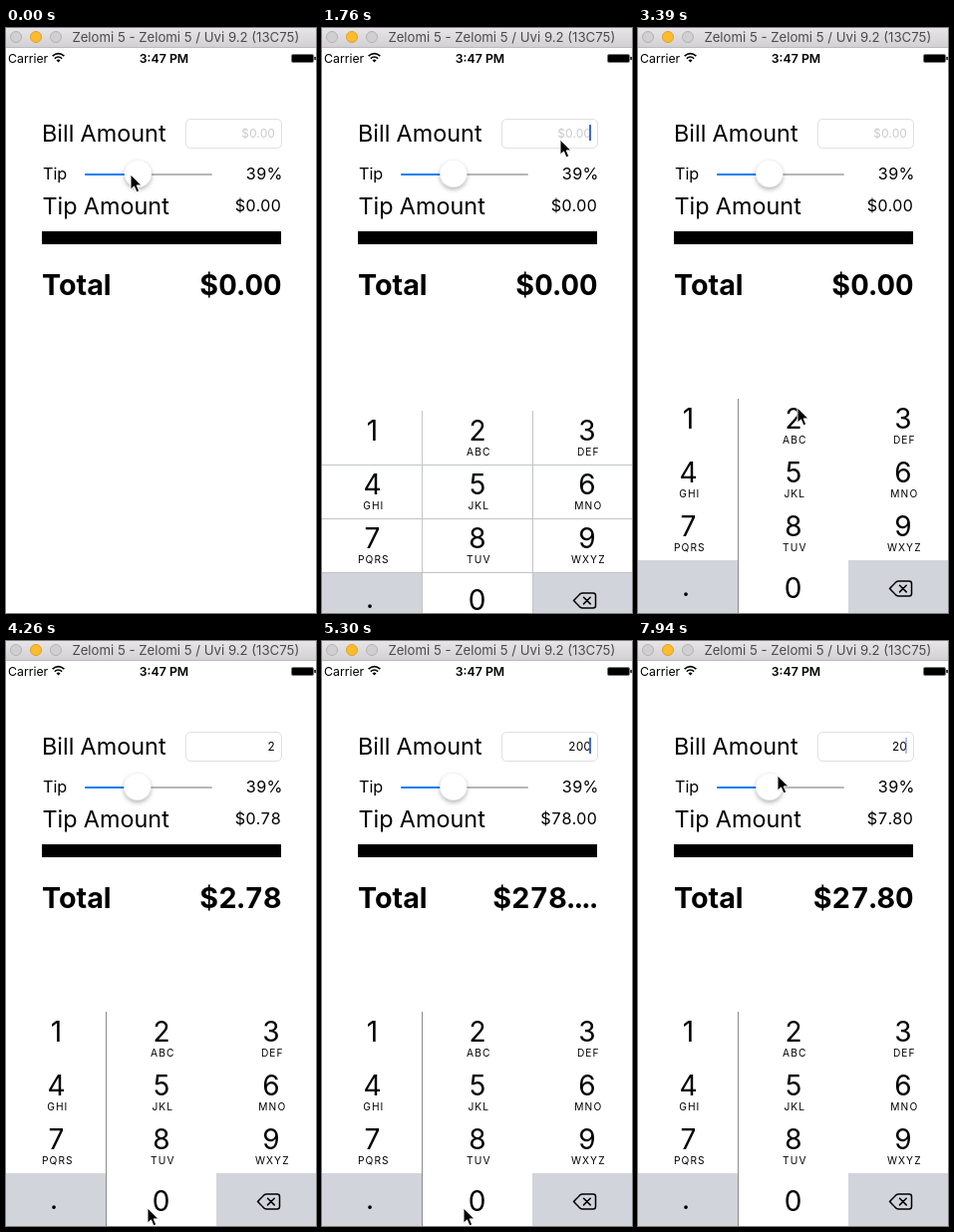
An HTML page that plays this animation: 311 by 587 pixels, repeating every 8000 ms.

```html
<!DOCTYPE html>
<html lang="en">
<head>
<meta charset="utf-8">
<title>Tip calculator</title>
<style>
html, body { margin: 0; width: 100%; height: 100%; overflow: hidden; background: #fff; }
svg { display: block; width: 311px; height: 587px; font-family: Inter, Roboto, sans-serif; font-variant-numeric: tabular-nums; }
.end { text-anchor: end; }
.mid { text-anchor: middle; }
.big { font-size: 23.4px; }
.body { font-size: 16.2px; }
.total { font-size: 28.7px; font-weight: 700; }
.small { font-size: 11.8px; }
.status { font-size: 12.3px; font-variant-numeric: normal; }
.digit { font-size: 28px; font-variant-numeric: normal; }
.letters { font-size: 10.2px; letter-spacing: 1.1px; }
</style>
</head>
<body>
<svg viewBox="0 0 311 587">
  <defs>
    <linearGradient id="chrome" x2="0" y2="1">
      <stop stop-color="#e7e5e8"/><stop offset="1" stop-color="#d1cfd2"/>
    </linearGradient>
    <filter id="shadow" x="-50%" y="-50%" width="200%" height="200%">
      <feDropShadow dx="0" dy="2.5" stdDeviation="2" flood-opacity=".28"/>
    </filter>
  </defs>

  <rect width="311" height="20" fill="url(#chrome)"/>
  <path d="M0 19.5H311" stroke="#bcbabd"/>
  <g fill="#d0d0d0" stroke="#b2b2b2">
    <circle cx="10" cy="9" r="5.5"/>
    <circle cx="30" cy="9" r="5.5" fill="#fdbc2e" stroke="#e0a028"/>
    <circle cx="50" cy="9" r="5.5"/>
  </g>
  <text x="180.3" y="14" class="mid" font-size="13.2" fill="#4b4b4b" style="font-variant-numeric: normal">Zelomi 5 - Zelomi 5 / Uvi 9.2 (13C75)</text>

  <text x="2" y="34.5" class="status">Carrier</text>
  <g fill="none" stroke="#000" stroke-width="1.6">
    <path d="M46.6 28.2Q52.5 23.2 58.4 28.2M48.8 30.6Q52.5 27.4 56.2 30.6"/>
    <path d="M50.5 32.4Q52.5 30.8 54.5 32.4L52.5 34.6Z" fill="#000" stroke="none"/>
  </g>
  <text x="158.5" y="34.5" class="status mid" font-weight="600">3:47 PM</text>
  <rect x="286.5" y="26.5" width="22" height="8" rx="1.5" stroke="#777"/>
  <rect x="309.3" y="28.7" width="1.5" height="3.6" rx=".7"/>

  <text x="36" y="114" class="big">Bill Amount</text>
  <rect x="180.5" y="91.5" width="96" height="29" rx="4.5" fill="#fff" stroke="#e0e0e0"/>
  <text id="bill" x="270" y="109.5" class="small end"></text>
  <rect id="caret" x="268" y="97" width="2" height="16" fill="#3e68d8"/>

  <text x="37" y="151.5" class="body">Tip</text>
  <path d="M80 147H206" stroke="#b6b6b6" stroke-width="2" stroke-linecap="round"/>
  <path id="fill" stroke="#0b80f5" stroke-width="2" stroke-linecap="round"/>
  <circle id="thumb" cy="146" r="13.7" fill="#fff" stroke="#000" stroke-opacity=".1" stroke-width=".5" filter="url(#shadow)"/>
  <text id="percent" x="277.5" y="151.5" class="body end"></text>

  <text x="36.5" y="186.5" class="big">Tip Amount</text>
  <text id="tip" x="276" y="183.5" class="body end"></text>
  <rect x="36" y="204" width="240" height="13"/>
  <text x="36" y="268" class="total">Total</text>
  <text id="total" x="276.5" y="268" class="total end"></text>

  <g id="pad">
    <rect y="372" width="311" height="216" fill="#fff"/>
    <path d="M0 534H100V588H0ZM211 534H311V588H211Z" fill="#d1d5db"/>
    <rect id="press" x="101" width="110" height="54" fill="#d1d5db"/>
    <path id="grid" d="M0 426.5H311M0 480.5H311M0 534.5H311M100.5 372V588M211.5 372V588" stroke="#c2c4c8"/>
    <path id="line" d="M100.5 372V588" stroke="#8a8b8d"/>
    <g id="keys"></g>
    <g fill="none" stroke="#000" stroke-width="1.5" stroke-linejoin="round" stroke-linecap="round">
      <path d="M252.5 562.5L259 555.8Q260 555 261.5 555H272Q274.5 555 274.5 557.5V567.5Q274.5 570 272 570H261.5Q260 570 259 569.2Z"/>
      <path d="M262.5 559.2L269.2 565.9M269.2 559.2L262.5 565.9"/>
    </g>
  </g>

  <path id="pointer" d="M0 0V15.2L3.5 11.9L6 17.8L8.7 16.6L6.2 10.9H11Z" stroke="#fff"/>
</svg>

<script>
const LOOP = 8000, TICK = 147; // the screen refreshes once per tick
const FOCUS = 11;              // tick at which the bill field is tapped
const $ = id => document.getElementById(id);
const set = (id, attrs) => Object.entries(attrs).forEach(([k, v]) => $(id).setAttribute(k, v));
const clamp = v => Math.min(1, Math.max(0, v));
const ease = p => p * p * (3 - 2 * p);
const money = n => '$' + n.toFixed(2);
const fit = s => s.length > 6 ? s.slice(0, 4) + '....' : s;

// Pointer strokes between ticks; each begins where the last one ended.
const moves = [
  { from: 5, to: 8, x: 239, y: 112 },
  { from: 19, to: 23, x: 160, y: 381 },
  { from: 26, to: 29, x: 142, y: 569 },
  { from: 38, to: 44, x: 161, y: 395 },
  { from: 46, to: 53, x: 140, y: 135 }
];

// A key stays lit for one tick and takes effect when released.
const taps = [
  { tick: 24, key: '2', y: 372 },
  { tick: 31, key: '0', y: 534 },
  { tick: 35, key: '0', y: 534 },
  { tick: 50, key: 'delete' }
];

const letters = ['', 'ABC', 'DEF', 'GHI', 'JKL', 'MNO', 'PQRS', 'TUV', 'WXYZ'];
const label = (x, y, cls, s) => `<text x="${x}" y="${y}" class="${cls} mid">${s}</text>`;
$('keys').innerHTML = letters.map((s, i) => {
  const x = [50.5, 156, 266][i % 3], y = 402 + 54 * Math.floor(i / 3);
  return label(x, y, 'digit', i + 1) + label(x + 1.3, y + 15, 'letters', s);
}).join('') + label(155.5, 572, 'digit', '0') + label(48, 570, 'digit', '.');

function pointerAt(n) {
  return moves.reduce((p, m) => {
    const k = ease(clamp((n - m.from) / (m.to - m.from)));
    return { x: p.x + (m.x - p.x) * k, y: p.y + (m.y - p.y) * k };
  }, { x: 125, y: 147 });
}

function draw(t) {
  const n = Math.floor((t + 8) / TICK);

  // The dragged slider wavers briefly, then settles.
  const value = 38.8 + 0.6 * Math.cos(Math.PI * n) * 0.6 ** n;
  const percent = Math.round(value), thumbX = 93 + value;
  $('percent').textContent = percent + '%';
  set('thumb', { cx: thumbX });
  set('fill', { d: `M80 147H${thumbX}` });

  const done = taps.filter(p => p.tick < n);
  const text = done.reduce((s, p) => p.key === 'delete' ? s.slice(0, -1) : s + p.key, '');
  const tip = text * percent / 100;
  $('bill').textContent = text || '$0.00';
  set('bill', { fill: text ? '#000' : '#c9c9ce' });
  $('tip').textContent = money(tip);
  $('total').textContent = fit(money(+text + tip));

  // Every edit restarts the caret's seven-tick blink.
  const edit = done.length ? done.at(-1).tick + 1 : FOCUS;
  set('caret', { opacity: n < FOCUS ? 0 : clamp(3.4 - (n - edit) % 7) });

  const drop = n < FOCUS ? 220 : Math.round(110 * 0.11 ** (n - FOCUS));
  set('pad', { transform: `translate(0 ${drop})` });
  set('grid', { opacity: drop ? 1 : 0 });
  set('line', { opacity: drop ? 0 : 1 });

  const lit = taps.find(p => p.tick === n && p.y);
  set('press', { y: lit ? lit.y : 0, opacity: lit ? 1 : 0 });

  const { x, y } = pointerAt(n);
  set('pointer', { transform: `translate(${x} ${y})` });
}

const start = performance.now();
function frame() {
  draw((performance.now() - start) % LOOP);
  requestAnimationFrame(frame);
}
frame();
</script>
</body>
</html>
```
